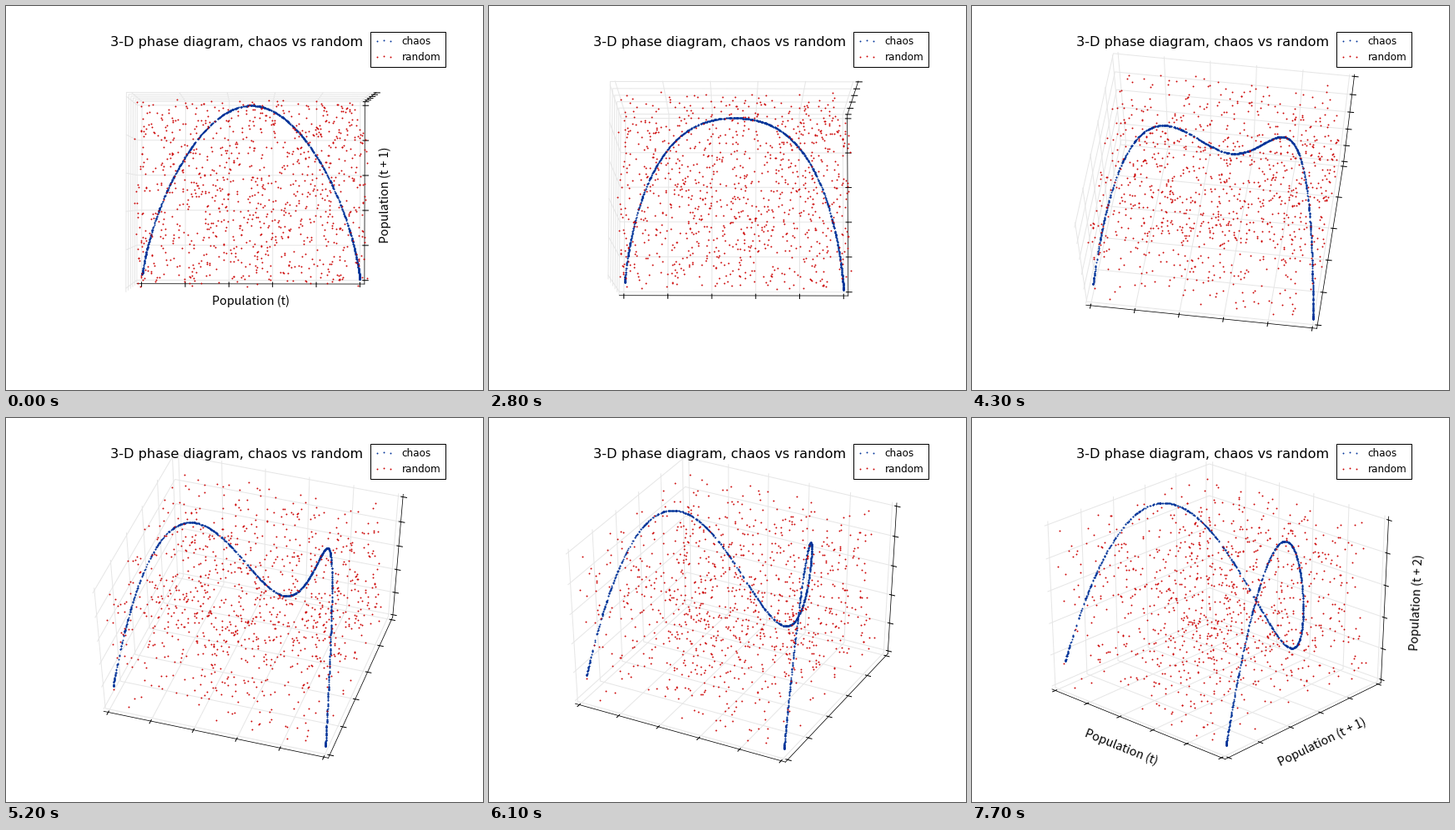
Write a matplotlib script that moves like this. It is 572 px wide and 460 px high and loops after 10000 ms.

```python
import random

import matplotlib.pyplot as plt
import numpy as np
from matplotlib.animation import FuncAnimation
from matplotlib.collections import LineCollection
from matplotlib.patches import Rectangle

W, H, DPI = 572, 460, 80
PX = 72 / DPI                      # points per pixel
BLUE, RED, GRID = '#003399', '#cc0000', '#e6e6e6'
LABEL_FONT = 'Noto Sans CJK JP'

# Camera: distance from the cube centre, image centre and scale in pixels
DIST = 11
CENTER = np.array([293.74, 223.57])
SCALE = np.array([558.0, -446.4]) / 0.185

# Camera path: first frame, frame count, elevation and azimuth change per frame
MOVES = [
    (20, 3, -0.5, 0.0),
    (23, 14, -1.0, 0.0),
    (37, 24, -1.5, 1.1),
    (61, 4, -1.0, 1.1),
    (65, 9, -0.5, 1.1),
    (74, 3, -0.2, 0.5),
]
LABELS_OFF, LABELS_ON, FRAMES = 20, 77, 100

LO, HI = -1 / 48, 1 + 1 / 48       # box limits
TICKS = np.linspace(0, 1, 6)
TICK_SHORT, TICK_LONG = 1 / 120, 1 / 60


def camera(n):
    elev, azim = 89.9, 270.1
    for first, count, d_elev, d_azim in MOVES:
        done = min(max(n - first + 1, 0), count)
        elev += done * d_elev
        azim += done * d_azim
    return np.radians(elev), np.radians(azim)


def project(points, elev, azim):
    se, ce = np.sin(elev), np.cos(elev)
    sa, ca = np.sin(azim), np.cos(azim)
    right = [-sa, ca, 0]
    up = [-se * ca, -se * sa, ce]
    toward = [ce * ca, ce * sa, se]
    p = np.asarray(points, float) - 0.5
    depth = DIST - p @ toward
    flat = np.stack([p @ right, p @ up], axis=-1)
    return CENTER + SCALE * flat / depth[..., None]


def phase_points(series):
    return np.column_stack([series[:-2], series[1:-1], series[2:]])


def logistic(count, rate=3.99, pop=0.5):
    series = []
    for _ in range(count):
        series.append(pop)
        pop = pop * rate * (1 - pop)
    return np.array(series)


random.seed(1)
chaos = phase_points(logistic(1000))
noise = phase_points(np.array([random.random() for _ in range(1000)]))

# Each grid line bends where two back walls meet
grid = np.array(
    [[(v, HI, HI), (v, HI, LO), (v, LO, LO)] for v in TICKS]
    + [[(HI, v, LO), (LO, v, LO), (LO, v, HI)] for v in TICKS]
    + [[(LO, LO, v), (LO, HI, v), (HI, HI, v)] for v in TICKS])
edges = np.array([
    [(LO, LO, LO), (HI, LO, LO)],
    [(HI, LO, LO), (HI, HI, LO)],
    [(HI, HI, LO), (HI, HI, HI)]])
near, far = HI - TICK_SHORT, HI + TICK_LONG
ticks = np.array(
    [[(v, LO + TICK_SHORT, LO), (v, LO - TICK_LONG, LO)] for v in TICKS]
    + [[(near, v, LO), (far, v, LO)] for v in TICKS]
    + [[(near, HI, v), (far, HI, v)] for v in TICKS])

fig = plt.figure(figsize=(W / DPI, H / DPI), dpi=DPI, facecolor='white')
ax = fig.add_axes([0, 0, 1, 1])
ax.set_xlim(0, W)
ax.set_ylim(H, 0)
ax.axis('off')


def dots(points, color, zorder):
    return ax.scatter(points[:, 0], points[:, 1], s=(1.9 * PX) ** 2,
                      c=color, linewidths=0, zorder=zorder)


def line(width):
    return ax.plot([], [], color='black', lw=width * PX, zorder=2)[0]


def write(x, y, text, size, font='DejaVu Sans', **kw):
    return ax.text(x, y, text, fontsize=size * PX, family=font, **kw)


def label(x, y, text, angle):
    return write(x, y, text, 14.3, LABEL_FONT, ha='center', va='center',
                 rotation=angle, zorder=5)


grid_lines = LineCollection([], colors=GRID, linewidths=PX, zorder=1)
ax.add_collection(grid_lines, autolim=False)
edge_lines = [line(0.75) for _ in edges]
tick_lines = [line(1) for _ in ticks]
chaos_dots = dots(chaos, BLUE, 3)
noise_dots = dots(noise, RED, 4)

write(277, 48, '3-D phase diagram, chaos vs random', 16.1, ha='center', zorder=5)

# Legend
ax.add_patch(Rectangle((436.5, 30.5), 90, 42, fc='white', ec='black',
                       lw=PX, zorder=6))
for base, name, color in [(46, 'chaos', BLUE), (65, 'random', RED)]:
    write(474.4, base, name, 12, zorder=7)
    marks = [(444.7, base - 4.2), (452.8, base - 5.2), (461, base - 3.8)]
    dots(np.array(marks), color, 7)

start_labels = [
    label(293.7, 353.5, 'Population (t)', 0),
    label(454.5, 226, 'Population (t + 1)', 90)]
end_labels = [
    label(178.5, 394, 'Population (t)', -21.8),
    label(420, 388.5, 'Population (t + 1)', 25.7),
    label(533.2, 220.7, 'Population (t + 2)', 87.3)]


def draw(n):
    view = camera(n)
    grid_lines.set_segments(project(grid, *view))
    for lines, ends in ((edge_lines, edges), (tick_lines, ticks)):
        for item, pair in zip(lines, project(ends, *view)):
            item.set_data(pair[:, 0], pair[:, 1])
    chaos_dots.set_offsets(project(chaos, *view))
    noise_dots.set_offsets(project(noise, *view))
    for text in start_labels:
        text.set_visible(n < LABELS_OFF)
    for text in end_labels:
        text.set_visible(n >= LABELS_ON)
    return []


anim = FuncAnimation(fig, draw, frames=FRAMES, init_func=lambda: draw(0),
                     interval=100, repeat=True, repeat_delay=0, blit=False)
plt.show()
```
